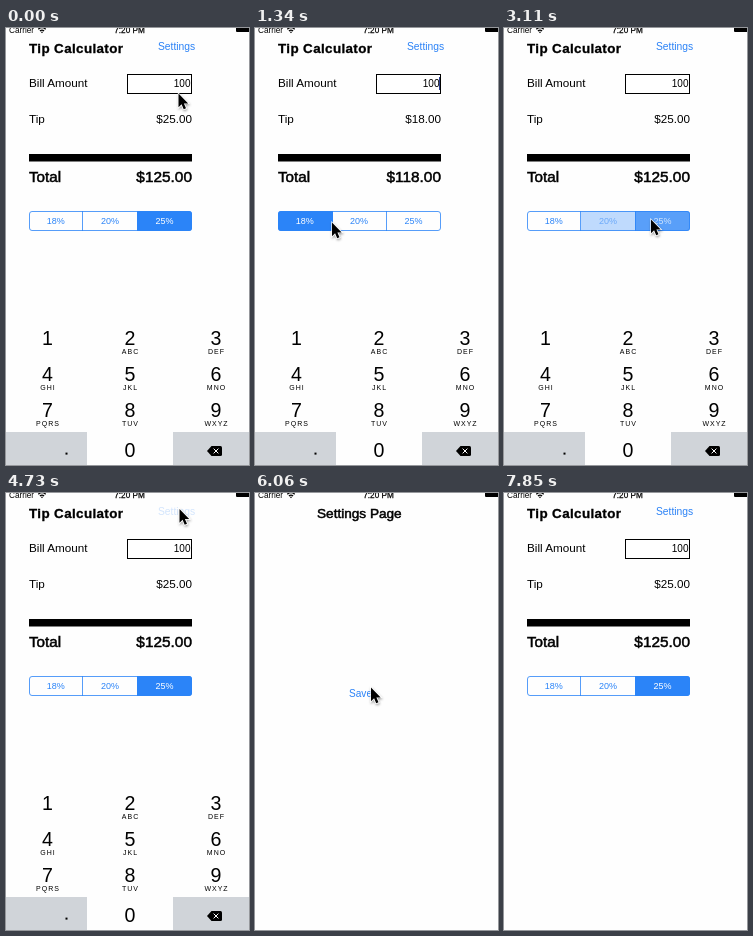
Recreate the animation shown at these times as an HTML page. Size 243 by 437 pixels, loop 8610 ms.

```html
<!DOCTYPE html>
<html lang="en">
<head>
<meta charset="utf-8">
<title>Tip Calculator</title>
<style>
  html, body { margin: 0; width: 100%; height: 100%; overflow: hidden; background: #fefefe; }
  svg { display: block; width: 100%; height: 100%; font-family: "Liberation Sans", Arial, sans-serif; }
  .title { font-weight: bold; letter-spacing: .38px; stroke: #000; stroke-width: .3; }
  .medium { stroke: #000; stroke-width: .5; }
  .m { text-anchor: middle; }
  .e { text-anchor: end; }
  .link { fill: #2b82f6; }
</style>
</head>
<body>
<svg viewBox="0 0 243 437">
  <defs>
    <clipPath id="round"><rect x="23" y="183" width="163" height="20" rx="3"/></clipPath>
    <filter id="shadow" x="-50%" y="-50%" width="220%" height="220%">
      <feDropShadow dx="0.6" dy="1.4" stdDeviation="0.9" flood-opacity=".4"/>
    </filter>
  </defs>

  <text class="title" x="23" y="25" font-size="13.4">Tip Calculator</text>
  <text class="link" id="open" x="152" y="22" font-size="10.3">Settings</text>
  <text x="23" y="59.2" font-size="11.7">Bill Amount</text>
  <rect x="121.5" y="46.5" width="64" height="19" fill="#fff" stroke="#000"/>
  <text class="e" x="184.5" y="59.2" font-size="10">100</text>
  <rect id="caret" x="184" y="49" width="1" height="13" fill="#2a3f90"/>
  <text x="23" y="94.8" font-size="11.7">Tip</text>
  <text class="e" id="tip" x="186" y="94.8" font-size="11.7"></text>
  <rect x="23" y="126" width="163" height="7.5"/>
  <text class="medium" x="23" y="154" font-size="15.2">Total</text>
  <text class="medium e" id="total" x="186" y="154" font-size="15.4"></text>

  <g id="segments" clip-path="url(#round)" font-size="9"></g>
  <g fill="none" stroke="#2b84f8" stroke-width=".8">
    <path d="M76.5 183V203M131.5 183V203"/>
    <rect x="23.5" y="183.5" width="162" height="19" rx="2.5"/>
  </g>

  <g id="keyboard">
    <path d="M0 404H81V437H0ZM167 404H243V437H167Z" fill="#d0d4d9"/>
    <g id="keys"></g>
    <rect x="59.5" y="424.6" width="2" height="2"/>
    <path d="M201 423L205.5 418H214.5Q216 418 216 419.5V426.5Q216 428 214.5 428H205.5Z"/>
    <path d="M207.6 420.6L212.4 425.4M212.4 420.6L207.6 425.4" stroke="#fff"/>
  </g>

  <g id="page">
    <rect width="243" height="445" fill="#fefefe"/>
    <text class="medium" x="62" y="24.6" font-size="13.6">Settings Page</text>
    <text class="link" id="save" x="94" y="203.6" font-size="10.1">Save</text>
  </g>

  <g id="status">
    <text x="3" y="4.7" font-size="8.2">Carrier</text>
    <path d="M32.3 1.2Q36 -1.8 39.7 1.2M33.9 3Q36 1.2 38.1 3" fill="none" stroke="#000" stroke-width="1.2"/>
    <path d="M34.7 3.8L36 5.3 37.3 3.8Z"/>
    <text class="m" x="123.5" y="4.6" font-size="8.2" stroke="#000" stroke-width=".25">7:20 PM</text>
    <path d="M230 0H243V4H231Q230 4 230 3Z"/>
  </g>

  <path id="cursor" d="M0 .6V14.2L3.1 11.3 5.2 16.2 7.5 15.3 5.4 10.4H9.7Z" stroke="#fff"
    stroke-width="1.3" paint-order="stroke" filter="url(#shadow)"/>
</svg>
<script>
const $ = id => document.getElementById(id);
const LOOP = 8610, STEP = 148;
const rates = [18, 20, 25];

$('segments').innerHTML = rates.map((r, i) =>
  `<rect x="${23 + 54 * i}" y="183" width="55" height="20" fill="#2b84f8"/>
   <text class="m" x="${49.8 + 54.3 * i}" y="196">${r}%</text>`).join('');
const fills = document.querySelectorAll('#segments rect');
const labels = document.querySelectorAll('#segments text');

const letters = ['', 'ABC', 'DEF', 'GHI', 'JKL', 'MNO', 'PQRS', 'TUV', 'WXYZ'];
const digit = (n, x, y) => `<text class="m" x="${x}" y="${y}" font-size="19.6">${n}</text>`;
$('keys').innerHTML = letters.map((s, i) => {
  const x = [41.5, 124, 210][i % 3], y = 316.5 + 36 * Math.floor(i / 3);
  return digit(i + 1, x, y) +
    `<text class="m" x="${x + .5}" y="${y + 9.3}" font-size="7" letter-spacing="1">${s}</text>`;
}).join('') + digit(0, 124, 429);

// Pointer stops: step, x, y
const stops = [
  [0, 172.5, 65], [4, 54, 193], [7, 54, 193], [9, 77, 194], [11, 77, 194],
  [13, 104, 198], [16, 104, 198], [19, 147, 191], [23, 147, 191], [26, 173.5, 15.5],
  [35, 173.5, 15.5], [41, 116, 194], [42, 110, 198], [43, 107, 200], [50, 107, 200],
  [52, 196, 411], [60, 196, 411]
];
// Segment presses: step, segment
const presses = [[5, 0], [14, 1], [20, 2]];

function pointer(k) {
  const i = stops.findIndex(s => s[0] > k);
  const [k0, x0, y0] = stops[i - 1], [k1, x1, y1] = stops[i];
  const u = (k - k0) / (k1 - k0), e = u * u * (3 - 2 * u);
  return [x0 + (x1 - x0) * e, y0 + (y1 - y0) * e];
}

// Remaining part of a critically damped slide after ms
function slide(ms) {
  const a = Math.max(0, ms) * .01826;
  return Math.exp(-a) * (1 + a);
}

function draw(time) {
  const k = Math.floor((time % LOOP + 18) / STEP), t = k * STEP;

  let weights = [0, 0, 1], chosen = 2;
  for (const [start, i] of presses) {
    if (k < start) break;
    if (k === start) { weights[i] = .25; continue; }
    const fading = k === start + 1;
    weights = rates.map((_, j) => j === i ? (fading ? .78 : 1) : j === chosen && fading ? .3 : 0);
    chosen = i;
  }
  weights.forEach((w, i) => {
    fills[i].setAttribute('fill-opacity', w);
    labels[i].style.fill = `color-mix(in srgb, #fff ${w * 100}%, #2b84f8)`;
  });
  $('tip').textContent = `$${rates[chosen]}.00`;
  $('total').textContent = `$${100 + rates[chosen]}.00`;

  const editing = k < 36;
  const blink = (t + 8780) % 1000 < 500;
  $('caret').style.display = editing && blink ? '' : 'none';
  $('keyboard').style.display = editing ? '' : 'none';
  $('open').style.opacity = k >= 31 && k < 36 ? .2 : 1;
  $('save').style.opacity = k >= 45 ? .2 : 1;

  const down = k < 40 ? slide(t - 4858) : 1 - slide(t - 6780);
  $('page').setAttribute('transform', `translate(0 ${437 * down})`);
  $('page').style.display = down > .995 ? 'none' : '';

  $('cursor').setAttribute('transform', `translate(${pointer(k)})`);
  $('cursor').style.display = k < 53 ? '' : 'none';
}

let begin;
function tick(now) {
  begin ??= now;
  draw(now - begin);
  requestAnimationFrame(tick);
}
draw(0);
requestAnimationFrame(tick);
</script>
</body>
</html>
```
